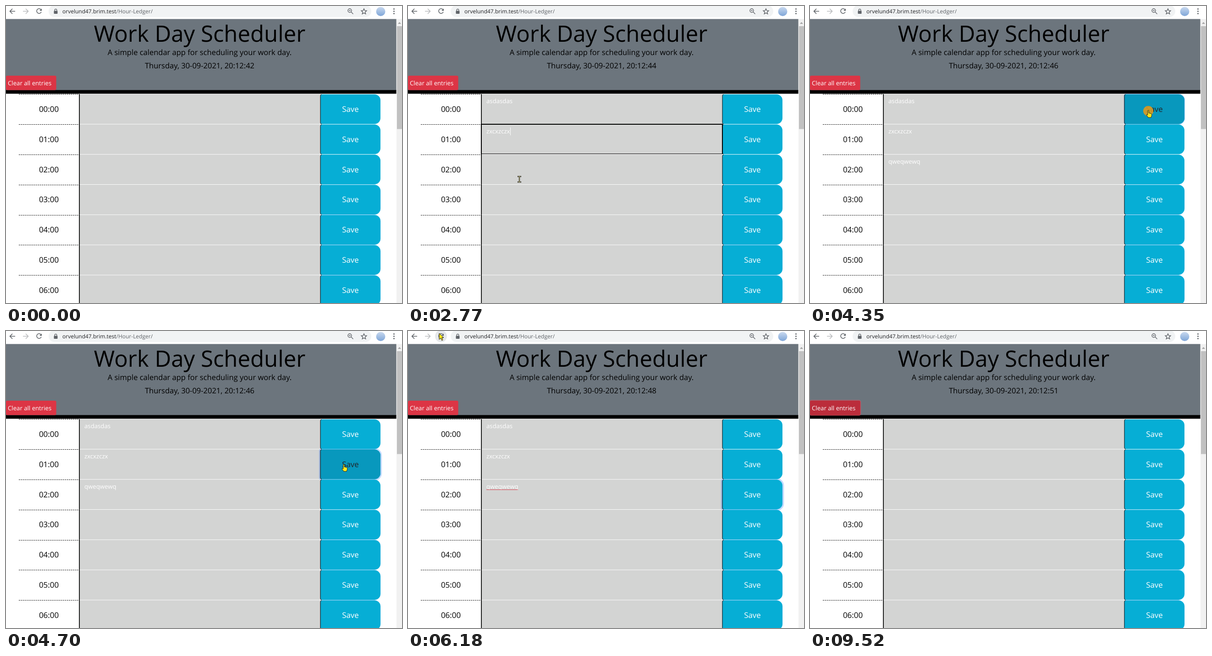
Write an HTML page that moves like this. It is 864 px wide and 648 px high and loops after 9590 ms.

```html
<!DOCTYPE html>
<html lang="en">
<head>
<meta charset="utf-8">
<title>Work Day Scheduler</title>
<style>
html, body { margin: 0; width: 100%; height: 100%; overflow: hidden; background: #fff; }
svg { display: block; width: 864px; height: 648px; font-family: "Open Sans", sans-serif; text-rendering: geometricPrecision; }
.mid { text-anchor: middle; }
.lead { font-size: 16.5px; }
.cell { font-size: 16.9px; }
.small { font-size: 13.2px; fill: #fff; }
.icon { fill: none; stroke: #5f6368; stroke-width: 1.6; }
.pointer { fill: #ffe81a; stroke: #222; stroke-width: 1; stroke-linejoin: round; }
</style>
</head>
<body>
<svg viewBox="0 0 864 648">
  <defs>
    <linearGradient id="sky" x2="0" y2="1">
      <stop stop-color="#c9d9ef"/><stop offset="1" stop-color="#7fa6d8"/>
    </linearGradient>
  </defs>

  <rect x="93" y="-1" width="704" height="25" rx="12.5" fill="#f1f3f4"/>
  <circle id="reloadHover" cx="72" cy="11.5" r="13" fill="#e6e8ea"/>
  <path class="icon" d="M20 11.5H8.5m5.5-5.5-5.5 5.5 5.5 5.5"/>
  <path class="icon" style="stroke:#babcbe" d="M37 11.5h11.5m-5.5-5.5 5.5 5.5-5.5 5.5"/>
  <g id="reload"><path class="icon" d="M76.3 7.8A5.2 5.2 0 1 0 77 13"/><path fill="#5f6368" d="M78 5.5v5h-5z"/></g>
  <path id="stop" class="icon" d="m67.5 7 9 9m0-9-9 9"/>
  <rect x="104.5" y="10.5" width="8" height="6.5" rx="1" fill="#5f6368"/>
  <path class="icon" style="stroke-width:1.3" d="M106.2 11V9a2.3 2.3 0 0 1 4.6 0v2"/>
  <text y="16" x="123" font-size="12" fill="#202124">orvelund47.brim.test<tspan fill="#5f6368">/Hour-Ledger/</tspan></text>
  <g class="icon" style="stroke-width:1.4">
    <circle cx="750" cy="10" r="4"/><path d="m753 13 4.5 4.5M748 10h4"/>
    <path d="m781 6 1.7 3.9 4.2.4-3.2 2.8 1 4.2-3.7-2.2-3.7 2.2 1-4.2-3.2-2.8 4.2-.4z"/>
  </g>
  <circle cx="817.5" cy="12" r="10" fill="url(#sky)"/>
  <g fill="#5f6368"><circle cx="846.5" cy="6.5" r="1.5"/><circle cx="846.5" cy="11.5" r="1.5"/><circle cx="846.5" cy="16.5" r="1.5"/></g>

  <rect y="28.4" width="851.6" height="156" fill="#6c757d"/>
  <rect y="183.4" width="851.6" height="8" fill="#000"/>
  <rect x="852" y="28.4" width="12" height="620" fill="#f1f1f1"/>
  <rect x="853" y="44" width="11" height="224.5" fill="#c1c1c1"/>
  <path d="M855 39l3.5-4 3.5 4z" fill="#a3a3a3"/>
  <text class="mid" x="422.5" y="77.6" font-size="49.1">Work Day Scheduler</text>
  <text class="mid lead" x="422.5" y="107">A simple calendar app for scheduling your work day.</text>
  <text class="mid lead" x="422.5" y="136.3" id="clock"></text>

  <rect id="clearGlow" fill="#e15361" fill-opacity=".5"/>
  <rect y="152" width="109.6" height="31.4" rx="3" fill="#dc3545"/>
  <rect id="clearHover" y="152" width="109.6" height="31.4" rx="3" fill="#bb2d3b"/>
  <text class="small" x="4" y="172.5">Clear all entries</text>

  <g id="slots"></g>
  <g id="glows"></g>
  <g id="saves"></g>
  <path id="focus" fill-rule="evenodd" d="M159-1H687V65H159zM161 1V64H685V1z"/>
  <g id="entries"></g>
  <rect id="caret" width="1" height="17" fill="#fff"/>
  <path id="squiggle" fill="none" stroke="#dc3545"/>

  <circle id="ring" r="11" fill="#e39a1b" fill-opacity=".88"/>
  <g id="cursor">
    <path id="arrow" class="pointer" d="M0 0v13.5l3.3-3 2.5 5.2 2.3-1.1-2.5-5h4.4z"/>
    <path id="hand" class="pointer" d="M-1.2.3q1.2-1.3 2.4 0v5.2l5 1q1.3.5 1.3 2v3l-1.5 3.8h-6l-4-5.3q0-1.8 1.6-1.1l1.2 1z"/>
    <g id="beam" fill="none">
      <path d="M-4-6h8M-4 6h8M0-6V6" stroke="#222" stroke-width="2.4"/>
      <path d="M-3-6h6M-3 6h6M0-6V6" stroke="#cdc582" stroke-width=".9"/>
    </g>
  </g>
</svg>
<script>
const LOOP = 9590, STEP = 70, TOP = 192.3, PITCH = 65.83;
const el = id => document.getElementById(id);
const clamp = v => Math.max(0, Math.min(1, v));
const ramp = (t, from, span = 150) => clamp((t - from) / span);
const within = (t, a, b) => t >= a && t < b;
const show = (id, on) => el(id).setAttribute('visibility', on ? 'visible' : 'hidden');
const set = (node, attrs) => { for (const k in attrs) node.setAttribute(k, attrs[k]); };
const rowY = i => TOP + PITCH * i;

// Focus and save times belong to the first three rows.
const entries = [
  { text: 'asdasdas', focus: 670, type: 1130, hover: [4150, 4450], save: 4290 },
  { text: 'zxcxzczx', focus: 1950, type: 2090, hover: [4490, 4820], save: 4560 },
  { text: 'qweqwewq', focus: 2970, type: 3170, hover: [4850, 5190], save: 5000 }
];
const BLUR = 4290, RELOAD = 6330, CLEAR = 7750;
const clicks = [610, 1880, 2900, 4270, 4555, 4990, 6250, 7610];
const path = [
  [190, 300, 617], [600, 243, 235], [1700, 243, 235], [1880, 243, 300],
  [2620, 243, 300], [2770, 243, 378], [3660, 243, 378], [3790, 409, 357],
  [4080, 700, 262], [4220, 738, 228], [4430, 738, 228], [4560, 737, 291],
  [4800, 737, 291], [4930, 738, 358], [5170, 738, 358], [5800, 38, 24],
  [6010, 68, 5], [6720, 68, 5], [7410, 87, 167], [8820, 87, 167], [9240, 758, 610]
];

function saveShape(y) {
  return `M689 ${y}H804a13 13 0 0 1 13 13v38.8a13 13 0 0 1-13 13H689a3 3 0 0 1-3-3V${y + 3}a3 3 0 0 1 3-3z`;
}

function build() {
  let slots = '', glows = '', saves = '', texts = '';
  for (let i = 0; i < 7; i++) {
    const y = rowY(i), base = y + 38.7, shape = saveShape(y + .4);
    const label = fill => `<text class="mid cell" x="751.5" y="${base}" fill="${fill}">Save</text>`;
    slots += `<path d="M28 ${Math.round(y) + .5}H159" stroke="#000" stroke-dasharray="2.5 1.7"/>
      <text class="mid cell" x="93.5" y="${base}">0${i}:00</text>
      <rect x="161" y="${y + .2}" width="525" height="64.9" fill="#d3d4d3"/>
      <rect x="159.3" y="${y}" width="1.7" height="${PITCH}"/>`;
    glows += `<path d="${shape}" fill="none" stroke="#0d6efd" stroke-opacity=".25" stroke-linejoin="round"/>`;
    saves += `<path d="${shape}" fill="#06aed5"/>${label('#fff')}
      <g class="hover" opacity="0"><path d="${shape}" fill="#0898bd"/>${label('#212529')}</g>
      <path d="M688.5 ${y + .8}a2.5 2.5 0 0 0-2.5 2.5v59a2.5 2.5 0 0 0 2.5 2.5" fill="none" stroke="#000"/>`;
    if (entries[i]) texts += `<text class="small" x="171" y="${y + 19.7}"></text>`;
  }
  el('slots').innerHTML = slots;
  el('glows').innerHTML = glows;
  el('saves').innerHTML = saves;
  el('entries').innerHTML = texts;
  el('squiggle').setAttribute('d', 'M171 347' + 'l1.5-1.5 1.5 1.5'.repeat(23));
}

function cursorAt(t) {
  const k = path.findIndex(p => p[0] > t);
  if (k < 1) return path[k < 0 ? path.length - 1 : 0].slice(1);
  const [t0, x0, y0] = path[k - 1], [t1, x1, y1] = path[k];
  const u = (t - t0) / (t1 - t0), e = u * u * (3 - 2 * u);
  return [x0 + (x1 - x0) * e, y0 + (y1 - y0) * e];
}

function cursorKind(x, y) {
  if (y > TOP && x > 161 && x < 685) return 'beam';
  const onSave = y > TOP && x >= 685 && x < 817;
  const onClear = x < 110 && y > 152 && y < 184;
  return onSave || onClear ? 'hand' : 'arrow';
}

function drawPointer(t) {
  const [x, y] = cursorAt(t), kind = cursorKind(x, y);
  const on = within(t, 190, 9240);
  for (const id of ['arrow', 'hand', 'beam']) show(id, on && id === kind);
  el('cursor').setAttribute('transform', `translate(${x} ${y})`);
  set(el('ring'), { cx: x, cy: y + 1 });
  show('ring', clicks.some(c => within(t, c, c + 130)));
}

function drawRows(t) {
  const texts = el('entries').children, glows = el('glows').children;
  const hovers = document.querySelectorAll('.hover');
  let active = -1;
  entries.forEach((e, i) => {
    const next = entries[i + 1];
    const count = t < e.type || t >= CLEAR ? 0 : Math.floor((t - e.type) / STEP) + 1;
    const typed = e.text.slice(0, count);
    if (texts[i].textContent !== typed) texts[i].textContent = typed;
    if (within(t, e.focus, next ? next.focus : BLUR)) active = i;
    const glow = t < RELOAD ? ramp(t, e.save) - ramp(t, next ? next.save : RELOAD) : 0;
    glows[i].setAttribute('stroke-width', 6.6 * glow);
    hovers[i].setAttribute('opacity', ramp(t, e.hover[0]) - ramp(t, e.hover[1]));
  });
  show('focus', active >= 0);
  show('caret', active >= 0);
  if (active >= 0) {
    const y = rowY(active);
    el('focus').setAttribute('transform', `translate(0 ${Math.round(y)})`);
    set(el('caret'), { x: 171.5 + texts[active].getComputedTextLength(), y: y + 7 });
  }
  show('squiggle', within(t, 5300, RELOAD));
}

function drawChrome(t) {
  const second = t < 930 ? 42 : 43 + Math.floor((t - 930) / 990);
  el('clock').textContent = `Thursday, 30-09-2021, 20:12:${second}`;
  const loading = within(t, 6250, 6440) || within(t, 7680, 7890);
  show('reload', !loading);
  show('stop', loading);
  el('reloadHover').setAttribute('opacity', ramp(t, 5930, 100) - ramp(t, 6800, 100));
  el('clearHover').setAttribute('opacity', ramp(t, 7260));
  const w = t < 9520 ? 3.3 * ramp(t, 7680) : 1.7;
  set(el('clearGlow'), { x: -w, y: 152 - w, width: 109.6 + 2 * w, height: 31.4 + 2 * w, rx: 3 + w });
  show('clearGlow', w > 0);
}

function frame() {
  const t = performance.now() % LOOP;
  drawChrome(t);
  drawRows(t);
  drawPointer(t);
  requestAnimationFrame(frame);
}

build();
frame();
</script>
</body>
</html>
```
